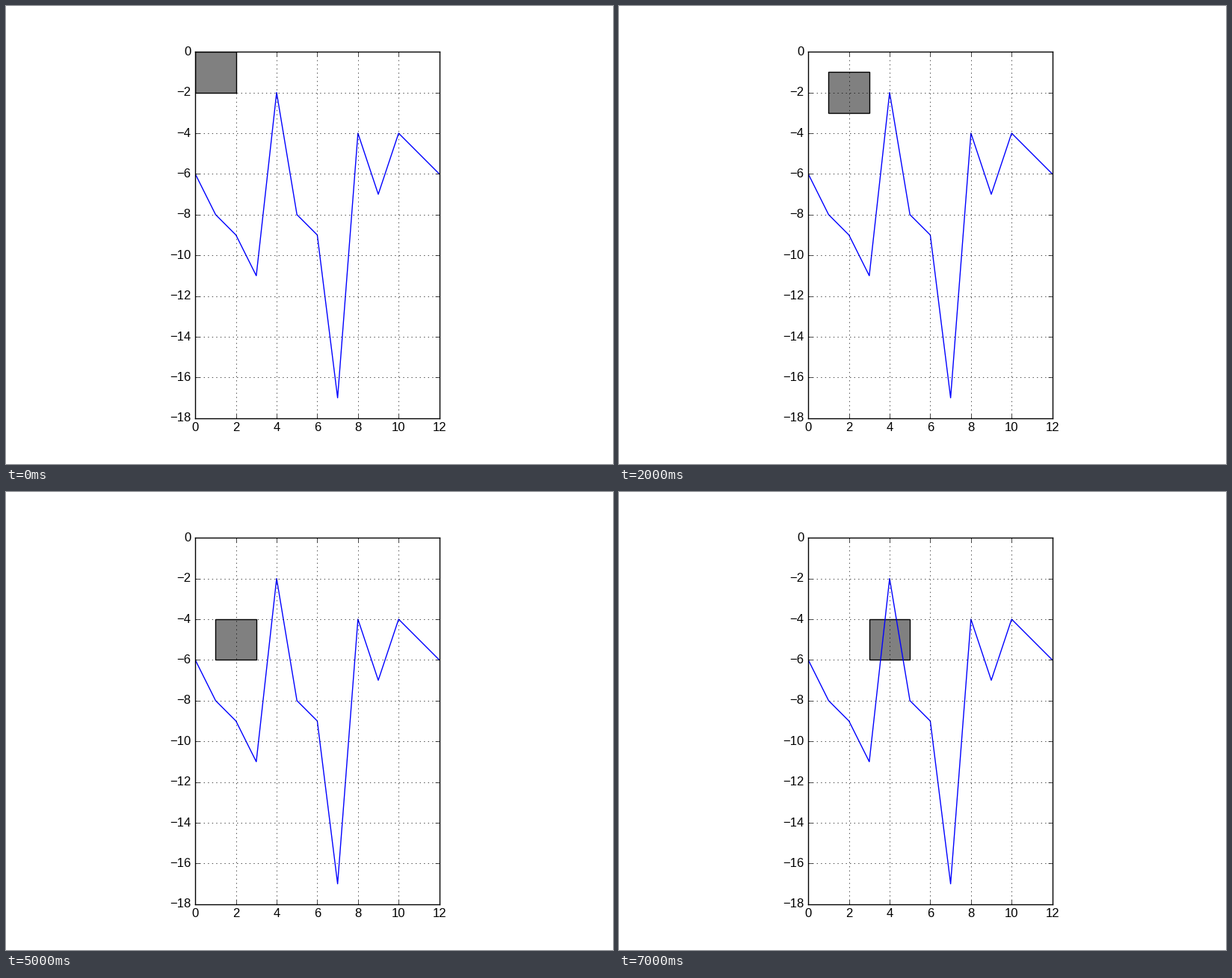
These frames come from a looping animation (812x612 px, 8 s). A matplotlib script:

```python
import matplotlib.pyplot as plt
from matplotlib.animation import FuncAnimation
from matplotlib.patches import Rectangle

W, H, DPI = 812, 612, 100
EPS = 1e-6                  # keeps the pixel size from rounding down
UNIT = 27.2                 # pixels per data unit on both axes
LEFT, BOTTOM = 253.2, 61.2  # lower left corner of the axes in pixels
COLS, ROWS = 12, 18

LEVELS = [-6, -8, -9, -11, -2, -8, -9, -17, -4, -7, -4, -5, -6]
SIZE = 2
STEPS = "RDDDDRR"           # moves of the square, one per second
MOVES = {"R": (1, 0), "D": (0, -1)}

plt.style.use("classic")
plt.rcParams.update({
    "font.family": "Liberation Sans",
    "font.size": 12,
    "savefig.dpi": DPI,
    "figure.facecolor": "white",
})

fig = plt.figure(figsize=(W / DPI + EPS, H / DPI + EPS), dpi=DPI)
ax = fig.add_axes([LEFT / W, BOTTOM / H, COLS * UNIT / W, ROWS * UNIT / H])
ax.plot(range(len(LEVELS)), LEVELS, color="blue", lw=1)
ax.set_xlim(0, COLS)
ax.set_ylim(-ROWS, 0)
ax.set_xticks(range(0, COLS + 1, 2))
ax.set_yticks(range(-ROWS, 1, 2))
ax.grid(True)

square = Rectangle((0, -SIZE), SIZE, SIZE, facecolor="gray",
                   edgecolor="black", lw=1)
ax.add_patch(square)


def update(i):
    path = [MOVES[s] for s in STEPS[:i]]
    x = sum(dx for dx, _ in path)
    y = sum(dy for _, dy in path)
    square.set_xy((x, y - SIZE))
    return (square,)


anim = FuncAnimation(fig, update, frames=len(STEPS) + 1, interval=1000,
                     repeat=True, repeat_delay=0, blit=False)
plt.show()
```
